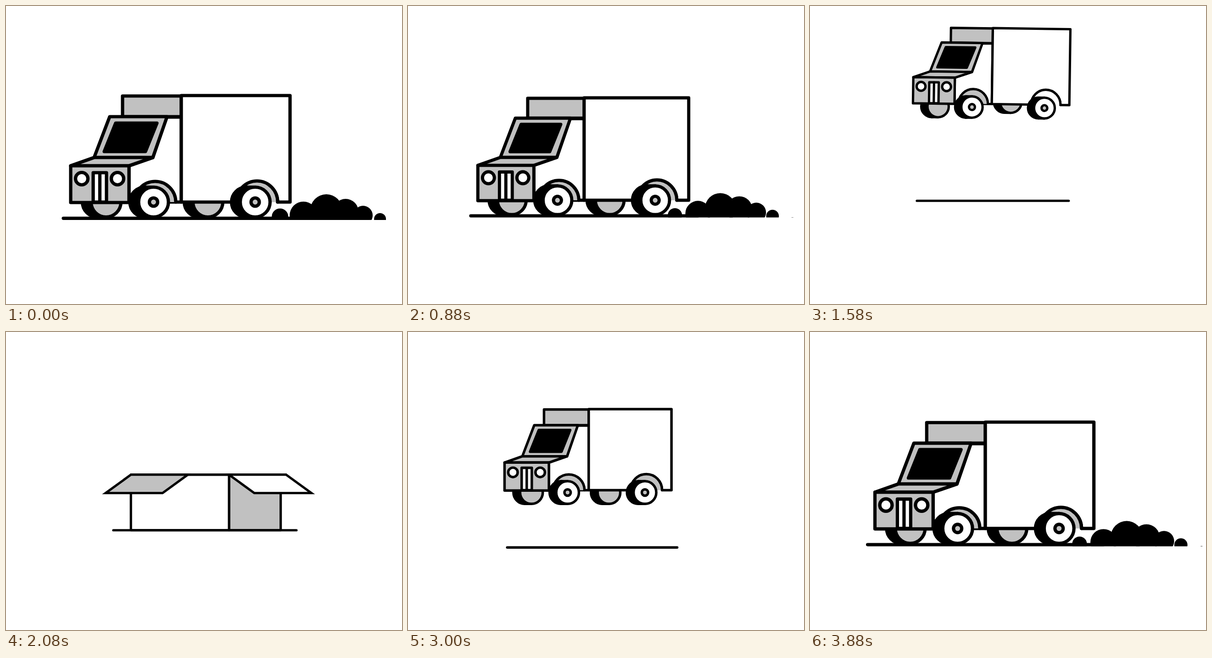
An HTML page that plays this animation: 863x649 px, repeating every 3.93 s.

```html
<!DOCTYPE html>
<html lang="en">
<head>
<meta charset="utf-8">
<title>Folding delivery van</title>
<style>
  html, body { margin: 0; width: 100%; height: 100%; overflow: hidden; background: #fff; }
  svg { display: block; width: 100%; height: 100%; }
  #camera { stroke: #000; fill: #fff; stroke-linejoin: round; stroke-linecap: round; }
  #camera * { vector-effect: non-scaling-stroke; }
  .gray { fill: #c1c1c1; }
  .black { fill: #000; }
  .open { fill: none; }
</style>
</head>
<body>
<svg viewBox="0 0 863 649">
  <clipPath id="aboveGround"><rect x="0" y="0" width="1200" height="466"/></clipPath>
  <g id="camera">
    <path id="ground"/>
    <g id="smoke" class="black" stroke="none" clip-path="url(#aboveGround)"></g>
    <g id="van">
      <g id="farFront"><circle class="black" cx="-19" r="32.5"/><path class="black" d="M-19-32.5H0V32.5H-19Z"/><circle class="gray" r="32.5"/></g>
      <g id="farRear"><circle class="black" cx="-19" r="32.5"/><path class="black" d="M-19-32.5H0V32.5H-19Z"/><circle class="gray" r="32.5"/></g>
      <g id="cab">
        <path class="gray" d="M254 196H382V241H254Z"/>
        <path d="M350 242H382V427H268V348L320 330Z"/>
        <path class="gray" d="M226 241H351L320 330H192Z"/>
        <path class="black" d="M239 255H329L304 317H214Z"/>
        <path class="gray" d="M192 330H320L268 348H141Z"/>
        <path class="gray" d="M141 348H268V428H141Z"/>
        <circle cx="165" cy="376" r="13.5"/>
        <circle cx="243" cy="376" r="13.5"/>
        <path d="M190 363H219V427H190ZM204.5 363V427"/>
        <path class="gray" d="M280 427A45 45 0 0 1 370 427"/>
      </g>
      <path id="side" class="gray"/>
      <path id="container"/>
      <path id="rearArch" class="gray" d="M502 427A45 46 0 0 1 592 427"/>
      <g id="flaps" stroke-linejoin="miter">
        <path id="topEdge" class="open"/>
        <path id="leftFlap" class="gray"/>
        <path id="rightFlap"/>
      </g>
      <g id="nearFront"><circle class="black" cx="-19" r="32.5"/><path class="black" d="M-19-32.5H0V32.5H-19Z"/><circle r="32.5"/><circle class="gray" r="9"/></g>
      <g id="nearRear"><circle class="black" cx="-19" r="32.5"/><path class="black" d="M-19-32.5H0V32.5H-19Z"/><circle r="32.5"/><circle class="gray" r="9"/></g>
    </g>
  </g>
</svg>
<script>
const LOOP = 3930, PUFF_PERIOD = 310, PUFFS = 7;
const el = Object.fromEntries([...document.querySelectorAll('[id]')].map(n => [n.id, n]));
const set = (node, attrs) => { for (const k in attrs) node.setAttribute(k, attrs[k]); };
const show = (node, on) => set(node, { visibility: on ? 'visible' : 'hidden' });
const lerp = (a, b, k) => a + (b - a) * k;
const smooth = (a, b, t) => {
  const k = Math.min(1, Math.max(0, (t - a) / (b - a)));
  return k * k * (3 - 2 * k);
};
// 1, then 0 between b and c, then 1 again
const present = (t, a, b, c, d) => 1 - smooth(a, b, t) + smooth(c, d, t);

// Monotone cubic through [position, value] keys
function curve(keys) {
  const n = keys.length;
  const slope = i => (keys[i + 1][1] - keys[i][1]) / (keys[i + 1][0] - keys[i][0]);
  const tangent = i => {
    if (i === 0 || i === n - 1) return 0;
    const a = slope(i - 1), b = slope(i);
    return a * b > 0 ? 2 * a * b / (a + b) : 0;
  };
  return x => {
    if (x <= keys[0][0]) return keys[0][1];
    if (x >= keys[n - 1][0]) return keys[n - 1][1];
    let i = 0;
    while (x > keys[i + 1][0]) i++;
    const h = keys[i + 1][0] - keys[i][0], k = (x - keys[i][0]) / h, j = 1 - k;
    return keys[i][1] * (1 + 2 * k) * j * j + keys[i + 1][1] * k * k * (3 - 2 * k)
      + h * k * j * (tangent(i) * j - tangent(i + 1) * k);
  };
}

const zoom = curve([[0, 1], [280, 1.01], [580, .998], [880, .9616], [1130, .903], [1400, .775], [1580, .713],
  [2670, .714], [2900, .735], [3130, .81], [3250, .861], [3330, .905], [3550, .96], [3790, .99], [3930, 1]]);
const pan = curve([[1130, 0], [1580, 1.5], [2080, 9], [2210, 9], [2500, 62], [2670, 66], [2750, 66],
  [3000, 40], [3250, 5], [3330, 1]]);
const lift = curve([[1150, 0], [1250, -60], [1400, -185], [1580, -260], [1650, -270], [1750, -255], [1900, -140],
  [2020, 35], [2200, 35], [2350, -130], [2480, -262], [2670, -278], [2750, -278], [2900, -215], [3050, -80], [3130, 0]]);
const shift = curve([[2300, 0], [2670, -7], [2900, 0]]);
const tilt = curve([[1250, 0], [1580, .8], [1750, 3], [1950, 0], [2350, 0], [2670, 3.7], [2950, 0]]);
const stretchX = curve([[1950, 1], [2080, 1.1], [2200, 1.12], [2350, .95], [2500, .95], [2670, 1.08], [2780, 1]]);
const stretchY = curve([[1080, 1], [1170, .94], [1280, 1.05], [1450, 1], [1900, 1], [1990, 1.08], [2080, .73],
  [2200, .8], [2320, 1.1], [2480, 1.2], [2670, .9], [2760, 1], [3130, 1], [3190, .95], [3270, 1]]);
const hang = curve([[1200, 0], [1400, 10], [1600, 10], [1800, 0], [2750, 0], [2900, 8], [3100, 4], [3150, 0]]);
const groundLeft = curve([[1130, 125], [1580, 153], [2080, 154.5], [2670, 168], [2800, 166], [3250, 126], [3330, 125]]);
const groundRight = curve([[1130, 640], [1580, 617], [2080, 714], [2200, 714], [2670, 628], [3250, 640]]);
const flapLength = curve([[1900, 0], [2020, 104], [2280, 104], [2420, 0]]);
const flapAngle = curve([[1900, -90], [2080, 47.6], [2170, 40], [2300, -40], [2420, -90]]);
const smokeAmount = curve([[1000, 1], [1080, .85], [1160, .45], [1230, 0], [3150, 0], [3250, .5], [3330, .85], [3480, 1]]);

const puffX = curve([[-1, 545], [0, 597], [1, 648], [2, 698], [3, 740], [4, 778], [5, 815], [6, 856]]);
const puffHeight = curve([[-1, 0], [0, 25], [1, 40], [2, 56], [3, 46], [4, 31], [5, 15], [6, 0]]);
const puffRadius = curve([[-1, 8], [0, 18], [1, 30], [2, 35], [3, 28], [4, 21], [5, 13], [6, 3]]);
const puffs = Array.from({ length: PUFFS }, () =>
  el.smoke.appendChild(document.createElementNS('http://www.w3.org/2000/svg', 'circle')));

function drawSmoke(t) {
  const amount = smokeAmount(t);
  const phase = (t + LOOP) / PUFF_PERIOD - LOOP / PUFF_PERIOD;
  const fraction = t < LOOP / 2 ? phase - Math.floor(phase)
    : ((t - LOOP) / PUFF_PERIOD) - Math.floor((t - LOOP) / PUFF_PERIOD);
  puffs.forEach((puff, i) => {
    const age = i - 1 + fraction;
    const size = Math.max(0, 1 - (1 - amount) * Math.max(0, age) * .95) * Math.min(1, amount * 1.2);
    const r = puffRadius(age) * size;
    set(puff, {
      cx: 600 + (1 - amount) * 60 + (puffX(age) - 600) * amount,
      cy: 466 - puffHeight(age) * size + r,
      r: age < 6 ? r : 0
    });
  });
}

function drawBox(t) {
  const fold = 1 - present(t, 1750, 1950, 2380, 2580);
  const left = lerp(382, 224, fold), middle = lerp(619, 496.5, fold), right = lerp(619, 640, fold);
  const arch = 45 * Math.max(0, 1 - 3 * fold), archX = 547 - 70 * fold;
  set(el.container, {
    d: arch > 0
      ? `M${left} 195H${middle}V427H${archX + arch}A${arch} ${arch} 0 0 0 ${archX - arch} 427H${left}Z`
      : `M${left} 195H${middle}V427H${left}Z`
  });
  show(el.side, fold > 0);
  set(el.side, { d: `M${middle} 195H${right}V427H${middle}Z` });

  const length = flapLength(t), angle = flapAngle(t) * Math.PI / 180;
  const dx = length * Math.cos(angle), dy = length * Math.sin(angle);
  const backRight = middle + 158.5 * fold;
  const flap = (a, b, out) => `M${a} 195H${b}l${out} ${dy}H${a + out}Z`;
  show(el.flaps, length > 0);
  set(el.topEdge, { d: `M${left} 195H${backRight}` });
  set(el.leftFlap, { d: flap(left, 382, -dx) });
  set(el.rightFlap, { d: flap(middle, backRight, dx) });
}

function drawVan(t) {
  const sx = stretchX(t), sy = stretchY(t), drop = hang(t);
  set(el.van, {
    transform: `translate(${382 + shift(t)} ${427 + lift(t)}) rotate(${tilt(t)}) scale(${sx} ${sy}) translate(-382 -427)`
  });

  const cab = present(t, 1720, 1930, 2400, 2600);
  show(el.cab, cab > .01);
  set(el.cab, { transform: `translate(382 0) scale(${cab} 1) translate(-382 0)` });

  const wheel = (node, x, size, raise) => {
    show(node, size > .01 && raise < 75);
    set(node, { transform: `translate(${x} ${427 + drop - raise}) scale(${size / sx} ${size / sy})` });
  };
  const rear = present(t, 1560, 1780, 2700, 2820);
  wheel(el.farFront, 218, 1, 76 * (1 - present(t, 1650, 1800, 2590, 2750)));
  wheel(el.farRear, 440, 1, 76 * (1 - present(t, 1530, 1700, 2730, 2860)));
  wheel(el.nearFront, 321.5, present(t, 1680, 1820, 2500, 2640), 0);
  wheel(el.nearRear, 543, rear, 0);

  show(el.rearArch, rear > .01);
  set(el.rearArch, { class: rear === 1 ? 'gray' : '' });
}

function draw(t) {
  const s = zoom(t);
  set(el.camera, {
    transform: `translate(431.5 ${324.5 + pan(t)}) scale(${s}) translate(-431.5 -324.5)`,
    'stroke-width': 7.2 * s
  });
  set(el.ground, { d: `M${groundLeft(t)} 462.3H${groundRight(t)}` });
  drawSmoke(t);
  drawVan(t);
  drawBox(t);
}

const start = performance.now();
function tick() {
  draw((performance.now() - start) % LOOP);
  requestAnimationFrame(tick);
}
tick();
</script>
</body>
</html>
```
